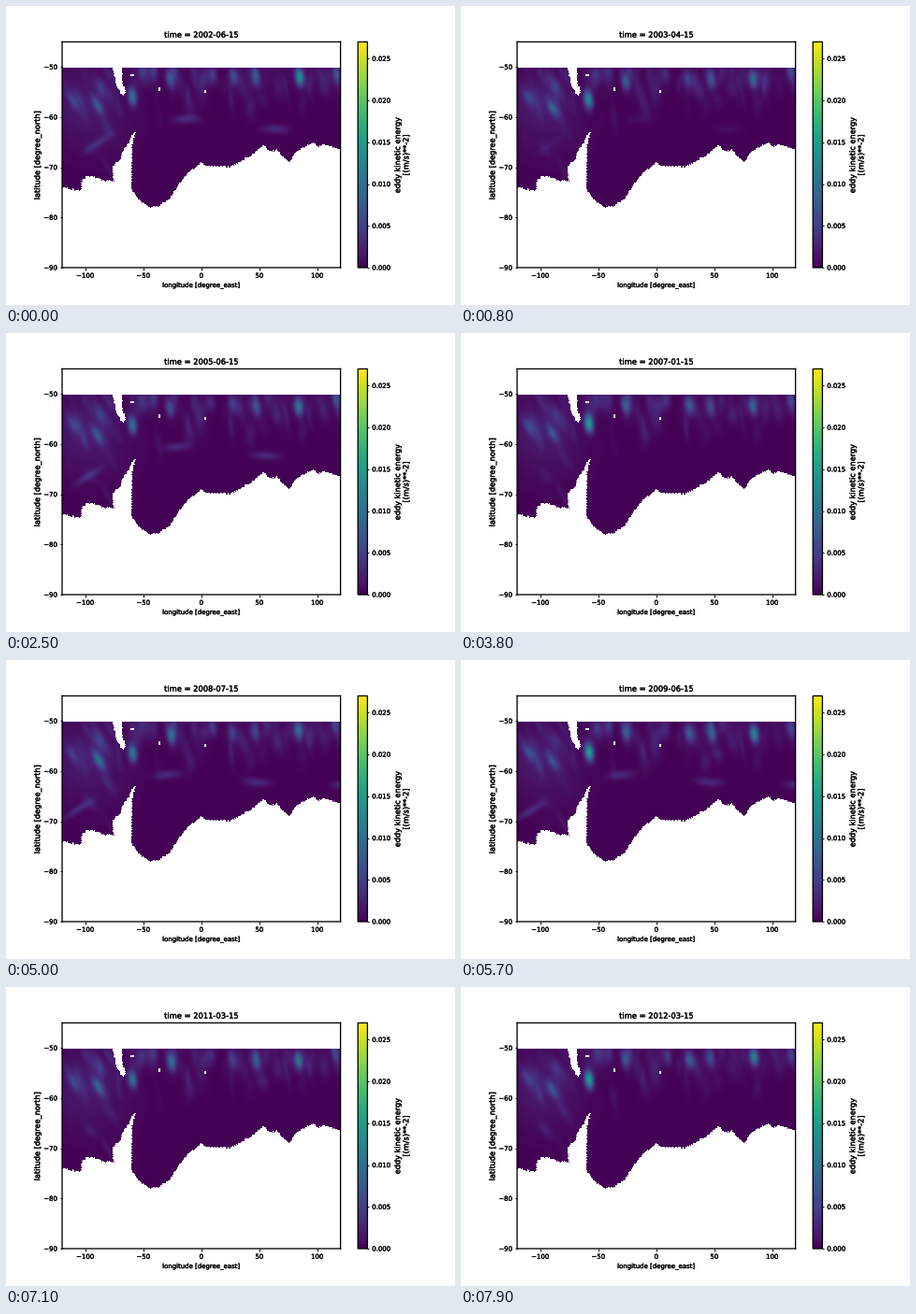
A matplotlib script that plays this animation: 480 by 320 pixels, repeating every 8000 ms.

```python
import numpy as np
import matplotlib.pyplot as plt
from matplotlib.animation import FuncAnimation
from matplotlib.path import Path
from matplotlib.patheffects import withStroke
from matplotlib.text import Text

W, H, DPI = 480, 320, 50
STEPS, INTERVAL = 80, 100
VMAX = 0.027
LEFT, RIGHT, TOP, BOTTOM = 60, 357.6, 38.4, 280
TALL = 11.8  # size of the rotated labels
rng = np.random.default_rng(7)


def lon(x):
    return -120 + (x - LEFT) * 240 / (RIGHT - LEFT)


def lat(y):
    return -90 + (BOTTOM - y) * 45 / (BOTTOM - TOP)


# Pixel grid of the ocean field
X0, X1, Y0, Y1 = 60, 357, 67, 217
X, Y = np.meshgrid(np.arange(X0, X1) + 0.5, np.arange(Y0, Y1) + 0.5)

COAST = [
    (50, 192), (80, 198), (81, 187), (86, 182), (97, 183), (105, 187),
    (115, 187), (114, 172), (123, 163), (124, 157), (130, 148), (136, 137),
    (139, 136), (135, 148), (134, 196), (142, 207), (153, 215), (163, 214),
    (175, 206), (184, 192), (195, 178), (206, 171), (209, 167), (213, 171),
    (240, 172), (262, 160), (275, 149), (283, 156), (290, 154), (302, 168),
    (310, 156), (329, 146), (334, 151), (340, 148), (370, 157),
    (370, 230), (50, 230)]
CAPE = [(114, 66), (118, 86), (125, 97), (128, 95), (124, 80), (124, 66)]
ISLANDS = [(133, 74, 4, 2), (163, 88, 2, 4), (212, 91, 2, 3)]


def land_mask():
    dx = rng.uniform(-0.6, 0.6, (X.shape[0], 1))
    dy = rng.uniform(-0.9, 0.9, X.shape[1])
    pts = np.column_stack([(X + dx).ravel(), (Y + dy).ravel()])
    land = Path(COAST).contains_points(pts) | Path(CAPE).contains_points(pts)
    land = land.reshape(X.shape)
    for x, y, w, h in ISLANDS:
        land |= (X > x) & (X < x + w) & (Y > y) & (Y < y + h)
    return land


def blob(x, y, sx, sy, tilt=0.0):
    u = (X - x - tilt * (Y - y)) / sx
    v = (Y - y) / sy
    return np.exp(-(u * u + v * v) / 2)


def weak_eddy():
    x = rng.uniform(60, 357)
    west = x < 132
    y = 68 + abs(rng.normal(0, 42 if west else 20))
    tilt = rng.uniform(0.1, 0.6) if west else rng.uniform(-0.1, 0.3)
    return blob(x, y, rng.uniform(2, 4), rng.uniform(5, 12), tilt)


LAND = land_mask()
BASE = 0.2 + 1.6 * blob(85, 112, 28, 28, 0.2)
WEAK = np.array([weak_eddy().ravel() for _ in range(110)])
W_AMP = rng.uniform(0.2, 1.3, len(WEAK))
W_RATE = rng.uniform(0.15, 0.6, len(WEAK))
W_PHASE = rng.uniform(0, 2 * np.pi, len(WEAK))

# Standing eddies: x, y, mean strength
SPOTS = [(136, 99, 12), (313, 78, 11), (176, 80, 7), (243, 78, 5.5),
         (98, 109, 6), (72, 101, 4), (267, 79, 4.5), (220, 74, 3.5),
         (145, 72, 3.5), (353, 72, 4)]
S_RATE = rng.uniform(0.2, 0.5, len(SPOTS))
S_PHASE = rng.uniform(0, 2 * np.pi, len(SPOTS))

# The winter ice edge, along which bands of motion drift west
EDGE = np.interp(X[0], (60, 130, 200, 265, 357), (170, 128, 121, 132, 135))
RIDGE = np.exp(-((Y - EDGE) / 3) ** 2 / 2)


def month_of(k):
    return max(k, int(np.ceil(1.5 * k - 2)))


def date_text(k):
    m = 5 + month_of(k)
    return f"time = {2002 + m // 12}-{m % 12 + 1:02d}-15"


def field(k):
    amp = W_AMP * (1 + 0.6 * np.sin(W_RATE * k + W_PHASE))
    z = BASE + (amp @ WEAK).reshape(X.shape)
    for (x, y, peak), rate, phase in zip(SPOTS, S_RATE, S_PHASE):
        a = rate * k + phase
        tilt = 0.4 if x < 132 else 0.1
        z += peak * (1 + 0.25 * np.sin(a)) * blob(
            x + np.sin(a), y + 2 * np.cos(a), 3.2, 6.5, tilt)
    m = month_of(k)
    winter = max(0, np.cos(2 * np.pi * (m - 0.5) / 12))
    wave = np.cos(2 * np.pi * (X - 98 + 0.27 * m) / 95)
    z += 3 * winter * np.maximum(0, wave) ** 2 * RIDGE
    return np.ma.array(z / 1000, mask=LAND)


plt.rcParams.update({
    "font.family": "DejaVu Sans", "font.size": 10, "axes.linewidth": 1.9,
    "xtick.major.width": 1.4, "ytick.major.width": 1.4,
    "xtick.major.size": 4.1, "xtick.major.pad": 4.3})
fig = plt.figure(figsize=(W / DPI, H / DPI), dpi=DPI, facecolor="white")


def add_axes(x, width):
    return fig.add_axes([x / W, 1 - BOTTOM / H, width / W, (BOTTOM - TOP) / H])


ax = add_axes(LEFT, RIGHT - LEFT)
img = ax.imshow(field(0), cmap="viridis", vmin=0, vmax=VMAX, aspect="auto",
                interpolation="nearest", origin="upper",
                extent=(lon(X0), lon(X1), lat(Y1), lat(Y0)))
ax.set(xlim=(-120, 120), ylim=(-90, -45), xticks=range(-100, 101, 50),
       yticks=range(-90, -49, 10))
ax.set_xlabel("longitude [degree_east]", labelpad=6)
ax.set_ylabel("latitude [degree_north]", fontsize=TALL, labelpad=3)
title = ax.set_title(date_text(0), fontsize=12, pad=7)

cax = add_axes(376.2, 10.2)
bar = fig.colorbar(img, cax=cax, ticks=np.arange(0, 0.026, 0.005))
bar.set_label("eddy kinetic energy\n[(m/s)**-2]", fontsize=TALL,
              linespacing=1.0)

for spine in [*ax.spines.values(), *cax.spines.values()]:
    spine.set_snap(False)
fig.canvas.draw()
for text in fig.findobj(Text):
    text.set_path_effects([withStroke(linewidth=0.5, foreground="black")])


def update(k):
    img.set_data(field(k))
    title.set_text(date_text(k))
    return img, title


anim = FuncAnimation(fig, update, frames=STEPS, interval=INTERVAL,
                     repeat=True, repeat_delay=0, blit=False)
plt.show()
```
